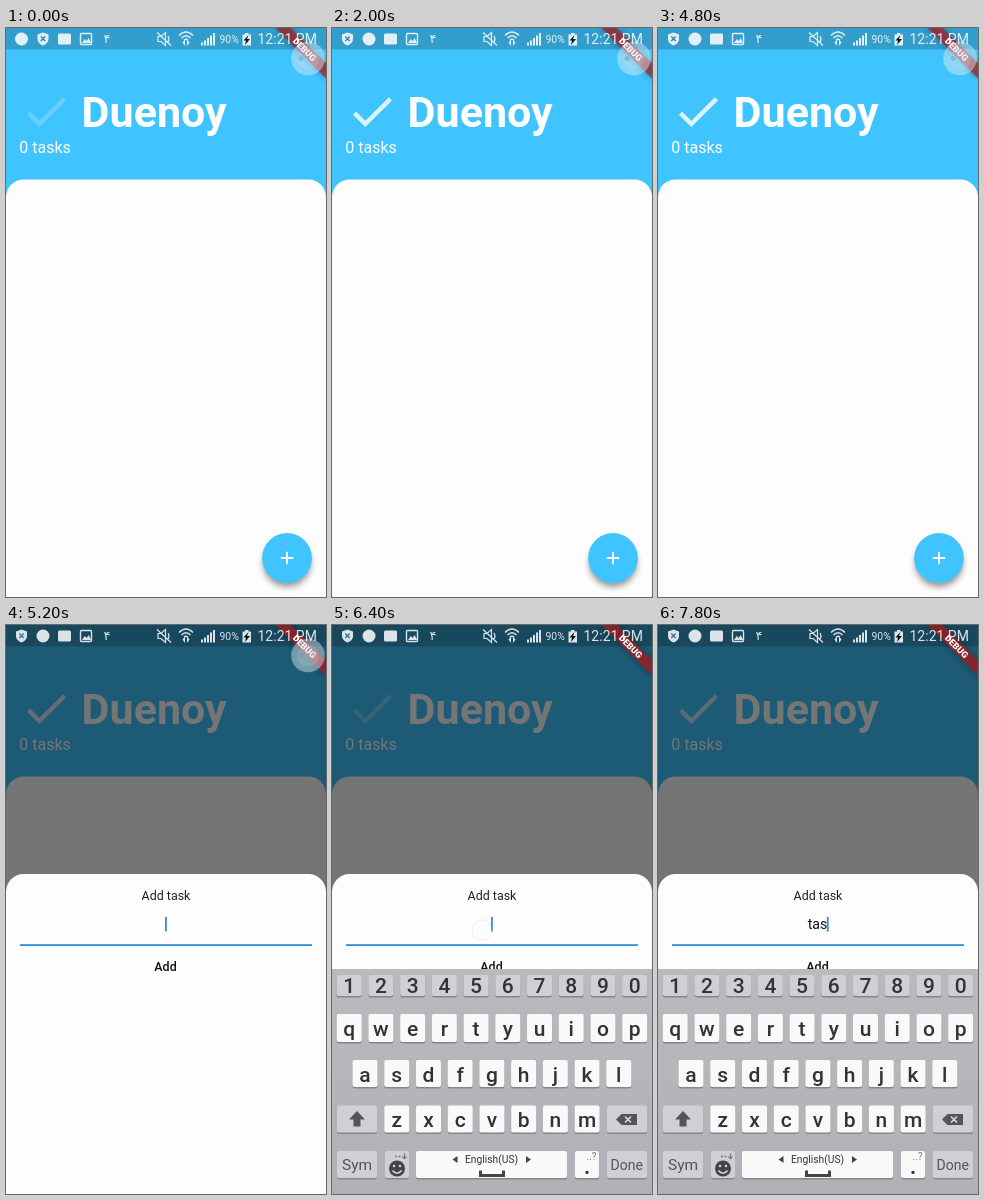
An HTML page that plays this animation: 320 by 569 pixels, repeating every 8 s.

```html
<!DOCTYPE html>
<html lang="en">
<head>
<meta charset="utf-8">
<title>To-do app</title>
<style>
  html, body { margin: 0; width: 100%; height: 100%; overflow: hidden; background: #40c4ff; }
  svg { display: block; width: 100vw; height: 100vh; font-family: Roboto, sans-serif; }
  .mid { text-anchor: middle; }
  .line { fill: none; stroke: #fff; }
</style>
</head>
<body>
<svg viewBox="0 0 320 569">
  <defs>
    <filter id="soft" x="-50%" y="-50%" width="200%" height="200%"><feGaussianBlur stdDeviation="3"/></filter>
    <linearGradient id="board" x2="0" y2="1">
      <stop stop-color="#b9babe"/><stop offset="1" stop-color="#b0b1b6"/>
    </linearGradient>
  </defs>

  <!-- Home screen -->
  <rect width="320" height="569" fill="#40c4ff"/>
  <path id="check" transform="translate(13.33 56.9) scale(2.222)" fill="#fff" d="M9 16.17 4.83 12l-1.42 1.41L9 19 21 7l-1.41-1.41z"/>
  <text x="75.6" y="98.5" font-size="43" font-weight="700" fill="#fff">Duenoy</text>
  <text x="13.3" y="125" font-size="16" fill="#fff">0 tasks</text>
  <rect y="151.4" width="320" height="440" rx="17.8" fill="#fdfdfd"/>
  <circle cx="281" cy="535" r="24" opacity=".4" filter="url(#soft)"/>
  <circle cx="281" cy="530" r="24.9" fill="#40c4ff"/>
  <path class="line" stroke-width="1.8" d="M274.8 530h12.4M281 523.8v12.4"/>
  <rect width="320" height="21.4" opacity=".2"/>

  <!-- Bottom sheet -->
  <g id="sheet">
    <rect width="320" height="569" opacity=".54"/>
    <rect y="249" width="320" height="340" rx="17.8" fill="#fdfdfd"/>
    <text class="mid" x="160" y="275" font-size="12.44" fill="#222">Add task</text>
    <text class="mid" id="entry" x="159.5" y="303.8" font-size="14.2" fill="#111"></text>
    <rect id="caret" y="292" width="1.8" height="14.5" fill="#3390cc"/>
    <rect x="14" y="319.2" width="292" height="1.8" fill="#2a90d4"/>
    <text class="mid" x="159.5" y="346" font-size="12.44" font-weight="500" fill="#111">Add</text>
  </g>

  <!-- Debug ribbon -->
  <g transform="translate(320) rotate(45)">
    <rect x="-36" y="25" width="72" height="10.7" opacity=".35" filter="url(#soft)"/>
    <rect x="-36" y="25" width="72" height="10.7" fill="#b71c1c" opacity=".68"/>
    <text class="mid" y="33.5" font-size="9" font-weight="900" fill="#fff">DEBUG</text>
  </g>

  <g id="keyboard"></g>

  <!-- Status bar -->
  <g fill="#fff" opacity=".85">
    <circle id="chat" cy="11" r="6.5"/>
    <g id="shield">
      <path d="M0 4.5 5.5 6.5V11C5.5 14 3 16.5 0 17.5-3 16.5-5.5 14-5.5 11V6.5z"/>
      <path d="M-2.2 8.5 2.2 13M2.2 8.5-2.2 13" stroke="#327fa5" stroke-width="1.4"/>
    </g>
    <rect x="52" y="5.5" width="13" height="11" rx="1.5"/>
    <rect class="line" x="74.5" y="5.5" width="11" height="11" rx="1" stroke-width="1.4"/>
    <path d="M76 15l2.8-4 2 2 1.8-3 2.6 5z"/>
    <text class="mid" x="101" y="15" font-size="13" style="font-family:'DejaVu Sans',sans-serif">۴</text>
    <path class="line" stroke-width="1.2" d="M152 8.5h3l4.5-4v13l-4.5-4h-3zM151 4.5 165 17.5M162 8q2 3 0 6"/>
    <path class="line" stroke-width="1.5" d="M173 7.5q7-7 14 0M175.5 10q4.5-4.500 9 0M178 12.200q2-1.800 4 0"/>
    <path d="M176.500 14.500l2.500-3v6.500zM183.500 14.500l-2.500-3v6.500z"/>
    <path d="M195 14.500h2v3h-2zM198 12.500h2v5h-2zM201 10h2v7.500h-2zM204 7.500h2v10h-2zM207 5h2v12.500h-2z"/>
    <text x="213.5" y="15" font-size="10.4">90%</text>
    <path d="M236.500 6.500h2.500V5h3.500v1.500h2.500v11h-8.500z"/>
    <path d="M242.500 7l-5 5.500h2.500l-1 4.500 5-6H241z" fill="#000"/>
    <text x="251.5" y="16" font-size="14">12:21 PM</text>
  </g>

  <!-- Floating assist button -->
  <g id="assist" fill="#dfeaf2">
    <circle cx="302" cy="30.5" r="16.8" opacity=".45"/>
    <circle cx="302" cy="30.5" r="11" opacity=".15"/>
    <circle cx="295" cy="30.5" r="2.5" fill="#6d9fc0" opacity=".5"/>
  </g>

  <circle id="touch" r="10" fill="#fff" fill-opacity=".72" stroke="#888" stroke-opacity=".35" stroke-width=".8"/>
</svg>

<script>
const LOOP = 8000, STEP = 200;
const el = id => document.getElementById(id);
const show = (id, on) => el(id).setAttribute('display', on ? 'inline' : 'none');
const move = (id, x, y) => el(id).setAttribute('transform', `translate(${x} ${y})`);

// Keyboard
const PITCH = 31.72;
const label = (text, x, y, size, fill = '#333', weight = 400) =>
  `<text class="mid" x="${x}" y="${y}" font-size="${size}" fill="${fill}" font-weight="${weight}">${text}</text>`;
const key = (x, y, w, h, fill) =>
  `<rect x="${x}" y="${y + 1.5}" width="${w}" height="${h}" rx="2" fill="#85868a"/>` +
  `<rect x="${x}" y="${y}" width="${w}" height="${h}" rx="2" fill="${fill}"/>`;
const row = (chars, firstX, y, h, baseline, fill, weight) => [...chars].map((c, i) => {
  const x = firstX + i * PITCH;
  return key(x - 12.5, y, 25, h, fill) + label(c, x, baseline, 21, '#333', weight);
}).join('');

const LIGHT = '#f9f9fa', GREY = '#cfd0d3';
el('keyboard').innerHTML =
  '<rect y="344" width="320" height="226" fill="url(#board)"/>' +
  row('1234567890', 17.2, 350, 21, 368, GREY, 500) +
  row('qwertyuiop', 17.2, 389, 28, 411, LIGHT, 500) +
  row('asdfghjkl', 33, 435, 27, 456.5, LIGHT, 500) +
  row('zxcvbnm', 64.8, 480.5, 27, 502, LIGHT, 500) +
  key(5, 480.5, 40, 27, GREY) + key(275, 480.5, 40, 27, GREY) +
  key(5, 526, 40, 27, GREY) + key(53, 526, 24, 27, GREY) +
  key(84, 526, 151, 27, LIGHT) + key(243, 526, 24, 27, LIGHT) + key(275, 526, 40, 27, GREY) +
  '<path d="M25 486l8 8.5h-4.5v7h-7v-7H17z" fill="#555"/>' +
  '<path d="M284 494.5l5.5-5.5H305v11h-15.5z" fill="#555"/>' +
  '<path d="M293 491.5l6 6M299 491.5l-6 6" stroke="#ddd" stroke-width="1.6"/>' +
  label('Sym', 25, 545, 15.5, '#555') + label('Done', 294.7, 544.5, 14, '#555') +
  '<circle cx="65" cy="543.5" r="8" fill="#444"/>' +
  '<path d="M60.5 545.5q4.5 5.5 9 0" fill="none" stroke="#ddd" stroke-width="1.6"/>' +
  '<circle cx="62" cy="541" r="1.2" fill="#ddd"/><circle cx="68" cy="541" r="1.2" fill="#ddd"/>' +
  '<path d="M63 531.5h2m1.5 0h2m4-3v4m-2-1q2 4 4 0" fill="none" stroke="#777" stroke-width="1.3"/>' +
  label('English(US)', 159.5, 538, 10.3) +
  '<path d="M125.5 531v7l-5-3.5zM194 531v7l5-3.5z" fill="#444"/>' +
  '<path d="M148.5 545.5v5h23v-5" fill="none" stroke="#444" stroke-width="3"/>' +
  label('.', 255, 549, 21, '#333', 700) + label('..?', 259.5, 534.5, 10, '#777');

// Timeline
const checkFade = [[0, .2], [1200, 1], [1400, 1], [2000, .8], [5200, .8], [6400, .3], [8000, .75]];
const touches = [
  { x: 270, y: 538, from: 2600, to: 3000 },
  { x: 150, y: 305, from: 6000, to: 6200 },
  { x: 144, y: 403, from: 6800, to: 6800 },
  { x: 33, y: 449, from: 7200, to: 7200 },
  { x: 64, y: 449, from: 7600, to: 7600 },
];
const FADE = 400;
const typed = [[6800, 't'], [7200, 'ta'], [7600, 'tas']];
const caretResets = [5200, 6200, 6800, 7200, 7600];
const CARET_X = { '': 159, t: 161.3, ta: 165.2, tas: 168.8 };

function lerpKeys(keys, t) {
  const i = Math.max(1, keys.findIndex(([time]) => time >= t));
  const [[t0, a], [t1, b]] = [keys[i - 1], keys[i]];
  return a + (b - a) * (t - t0) / (t1 - t0);
}

function draw(t) {
  el('check').setAttribute('opacity', lerpKeys(checkFade, t));

  const swapped = t >= 1800;
  el('chat').setAttribute('cx', swapped ? 37 : 15.5);
  move('shield', swapped ? 15.5 : 37, 0);

  show('sheet', t >= 5200);
  show('assist', t < 6200);

  const entry = (typed.filter(([time]) => t >= time).pop() || [0, ''])[1];
  el('entry').textContent = entry;
  el('caret').setAttribute('x', CARET_X[entry]);
  const reset = caretResets.filter(time => t >= time).pop() || 0;
  show('caret', (t - reset) % 1000 < 500);

  const rise = Math.min(1, Math.max(0, (t - 5800) / 400));
  show('keyboard', rise > 0);
  move('keyboard', 0, 226 * (1 - rise) ** 2);

  const touch = touches.find(p => t >= p.from && t < p.to + (p.from === p.to ? STEP : FADE));
  show('touch', touch);
  if (touch) {
    move('touch', touch.x, touch.y);
    el('touch').setAttribute('opacity', 1 - Math.max(0, t - touch.to) / FADE);
  }
}

const start = performance.now();
function tick() {
  const t = (performance.now() - start) % LOOP;
  draw(Math.floor(t / STEP) * STEP);
  requestAnimationFrame(tick);
}
tick();
</script>
</body>
</html>
```
